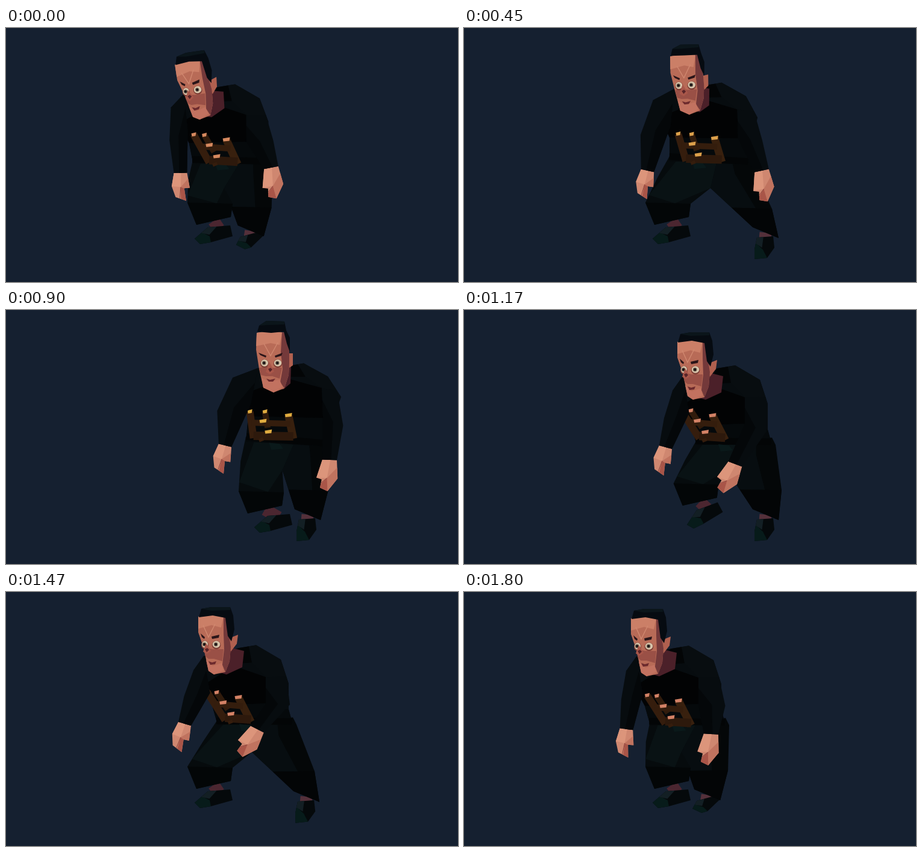
An HTML page that plays this animation: 750 px wide and 422 px high, repeating every 1.83 s.

```html
<!DOCTYPE html>
<html lang="en">
<head>
<meta charset="utf-8">
<title>Low-poly shuffle</title>
<style>
html, body { margin: 0; width: 100%; height: 100%; overflow: hidden; background: #152030; }
svg { display: block; width: 100%; height: 100%; }
</style>
</head>
<body>
<svg id="stage" viewBox="0 0 750 422"></svg>
<script>
const LOOP = 1830, STEP = 30;
const stage = document.getElementById('stage');

// The few free controls; the rest of the body follows from them.
const TIMES = [0, 450, 720, 900, 1170, 1470, 1800];
const HEAD = [[308, 104], [367, 95], [437, 110], [440, 88], [374, 99], [339, 87], [297, 90]];
const WRIST_L = [[289, 241], [304, 237], [350, 236], [363, 225], [334, 228], [296, 219], [269, 228]];
const WRIST_R = [[440, 232], [494, 237], [545, 253], [537, 249], [450, 256], [417, 228], [410, 236]];

const clamp = v => Math.min(1, Math.max(0, v));
const ease = (from, to, t) => { const u = clamp((t - from) / (to - from)); return u * u * (3 - 2 * u); };
const lerp = (a, b, k) => a + (b - a) * k;
const mix = (p, q, k) => p.map((v, i) => lerp(v, q[i], k));
const add = (p, x, y) => [p[0] + x, p[1] + y];
const points = text => text.split(' ').map(pair => pair.split(',').map(Number));

// A shape in two views; morph(k) blends from the first to the second.
function views(first, second) {
  const a = points(first), b = points(second);
  return k => a.map((p, i) => mix(p, b[i], k));
}

function place(shape, [x, y], degrees = 0) {
  const c = Math.cos(degrees * Math.PI / 180), s = Math.sin(degrees * Math.PI / 180);
  return shape.map(([px, py]) => [x + px * c - py * s, y + px * s + py * c]);
}

// Body shapes hang from the collar, hands from the wrist, feet from the ankle.
const torsoShape = views(
  '-24,4 0,0 40,22 62,56 42,112 36,138 -96,130 -92,88 -118,24 -76,8 30,41 32,91',
  '-30,5 0,0 41,24 54,64 54,107 61,132 -64,132 -73,100 -104,42 -87,18 16,53 16,97');
const stickShape = views('-80,84 -55,84 -16,90 -74,128 -8,129', '-78,79 -62,80 -26,88 -48,126 -5,129');
const handLShape = points('-10,-3 11,3 8,28 -1,26 -4,47 -19,36 -20,17');
const handRShape = points('-12,1 12,-1 17,29 3,52 -10,48 -9,34 -18,32');
const footLShape = points('-10,-14 27,-17 31,1 -5,11 -23,14 -32,5');
const footRShape = views('-11,0 16,-2 18,17 6,34 -15,36 -15,20', '-14,2 18,-7 24,0 4,19 -6,22 -21,15');

// Face features, centred between the eyes: front view, then turned left.
const face = {
  neck: views('20,4 33,6 32,34 20,44 8,40', '28,4 56,11 53,38 27,50 12,46'),
  skull: views('-24,-50 0,-54 24,-50 30,-22 30,0 29,20 22,42 4,49 -13,41 -20,10 -25,-22',
    '-20,-46 4,-50 26,-46 31,-16 34,4 32,28 25,46 6,50 -3,44 -11,6 -20,-20'),
  brow: views('-24,-50 0,-54 18,-50 14,-30 -1,-33 -25,-28', '-20,-46 4,-50 22,-47 18,-28 2,-32 -20,-26'),
  side: views('18,-51 24,-50 30,-22 30,0 29,20 22,42 15,32 19,10 16,-18',
    '22,-47 26,-46 31,-16 34,4 32,28 25,46 20,34 23,8 22,-18'),
  cheek: views('-20,8 -6,6 4,8 18,8 14,26 2,22 -9,22 -17,20', '-11,8 -6,6 4,8 22,8 20,28 6,24 -3,24 -8,20'),
  chin: views('-16,25 -4,31 14,28 19,40 4,49 -13,41', '-7,26 4,36 19,31 22,43 6,50 -3,44'),
  ear: views('28,-16 36,-16 36,4 30,8', '31,-10 46,-16 44,-1 34,12'),
  nose: views('-3,-2 -9,15 -2,19 5,14', '-7,-2 -12,12 -6,16 1,11'),
  nostril: views('-5,10 -1,8 2,11 -2,15', '-9,8 -5,6 -2,9 -6,13'),
  mouth: views('-8,26 -2,28 7,26 3,31 -4,31', '-3,28 3,30 10,28 8,33 0,34'),
  creases: views('-12,-32 -1,-12 11,-34', '-12,-32 -3,-12 8,-34'),
  browL: views('-21,-17 -8,-12 -9,-9 -18,-13', '-16,-18 -9,-12 -10,-9 -14,-12'),
  browR: views('6,-12 19,-17 17,-12 7,-9', '2,-13 15,-16 14,-11 3,-9'),
  hair: views('-20,-62 -8,-70 22,-69 25,-54 31,-42 31,-18 26,-32 21,-52 0,-50 -23,-52',
    '-15,-59 2,-62 33,-62 38,-48 40,-25 35,-5 29,-14 25,-44 4,-48 -19,-45'),
  sheen: views('-20,-62 -8,-70 22,-69 22,-64 -8,-63', '-15,-59 2,-62 33,-62 33,-57 2,-56')
};

// Monotone cubic through the key points, without overshoot.
function follow(keys, time) {
  const last = TIMES.length - 1, t = Math.min(time, TIMES[last]);
  let i = 0;
  while (i < last - 1 && t >= TIMES[i + 1]) i++;
  const span = TIMES[i + 1] - TIMES[i], u = (t - TIMES[i]) / span, v = 1 - u;
  return [0, 1].map(axis => {
    const secant = k => (keys[k + 1][axis] - keys[k][axis]) / (TIMES[k + 1] - TIMES[k]);
    const slope = k => {
      const a = secant(Math.max(0, k - 1)), b = secant(Math.min(last - 1, k));
      return a * b <= 0 ? 0 : 2 * a * b / (a + b);
    };
    return keys[i][axis] * (1 + 2 * u) * v * v + keys[i + 1][axis] * u * u * (3 - 2 * u)
      + span * u * v * (slope(i) * v - slope(i + 1) * u);
  });
}

const coords = list => list.map(p => p.map(v => v.toFixed(1)).join()).join(' ');
const poly = (list, fill) => `<polygon points="${coords(list)}" fill="${fill}"/>`;
const line = (list, stroke, width) =>
  `<polyline points="${coords(list)}" fill="none" stroke="${stroke}" stroke-width="${width}"/>`;

// Degrees by which an arm swings to the left of straight down.
const swing = (shoulder, wrist) =>
  Math.atan2(shoulder[0] - wrist[0], wrist[1] - shoulder[1]) * 180 / Math.PI;

function drawFoot(f, cuffA, cuffB, skin) {
  const ankle = mix(f[0], f[1], .5);
  return line([mix(cuffA, cuffB, .5), add(ankle, 0, 4)], skin, 20)
    + poly(f, '#05090b')
    + poly([mix(f[0], f[5], .45), mix(f[0], f[3], .6), f[3], f[4], f[5]], '#071b1a')
    + poly([f[0], mix(f[0], f[1], .4), mix(f[0], f[3], .5), mix(f[0], f[5], .5)], '#131f24');
}

function drawLegs(torso, time) {
  // Left foot steps right and back; right foot steps in near the loop's seam.
  const stepL = ease(500, 800, time) - ease(960, 1410, time);
  const stepR = ease(1440, 1800, time) - ease(1790, 2190, time) + 1 - ease(-40, 360, time);
  const air = Math.sin(Math.PI * stepL);
  const ankleL = [345 + 99 * stepL, 345 + 11 * stepL - 8 * air];
  const ankleR = [497 - 97 * clamp(stepR), 348 - 3 * clamp(stepR)];
  const footL = place(footLShape, ankleL, -16 * air);
  const footR = place(footRShape(clamp(stepR)), ankleR);
  const crotch = [(ankleL[0] + ankleR[0]) / 2 - 12, 266];

  const shift = add(ankleL, -14 * stepL, 0);
  const [kneeIn, cuffIn, cuffOut, kneeOut] = place(points('31,-53 28,-31 -29,-18 -44,-55'), shift);
  const waistL = torso[6], waistMid = mix(torso[6], torso[5], .6);
  const hipL = add(mix(waistL, kneeOut, .4), -4, 0);
  const legL = [add(waistL, 0, -8), waistMid, crotch, kneeIn, cuffIn, cuffOut, kneeOut, hipL];

  const hipR = add(torso[5], 6, 0);
  const [outR, inR] = [add(ankleR, 25, 1), add(ankleR, -18, -17)];
  const kneeR = add(mix(hipR, outR, .6), 7, 0), innerR = mix(crotch, inR, .5);
  const legR = [mix(torso[6], torso[5], .3), add(torso[5], 0, -12), hipR, kneeR, outR, inR, innerR, crotch];

  return drawFoot(footL, cuffIn, cuffOut, '#4b2630') + drawFoot(footR, outR, inR, '#54303a')
    + poly(legR, '#040708')
    + poly([legR[0], mix(legR[0], legR[1], .7), mix(hipR, crotch, .4), mix(kneeR, innerR, .4), innerR, crotch], '#070d10')
    + poly([mix(kneeR, innerR, .45), kneeR, outR, inR, innerR], '#030506')
    + poly(legL, '#060b0d')
    + poly([mix(legL[0], waistMid, .2), waistMid, crotch, mix(kneeIn, kneeOut, .35), mix(kneeOut, hipL, .3)], '#091214')
    + poly([kneeIn, cuffIn, cuffOut, kneeOut, mix(kneeIn, kneeOut, .45)], '#030607');
}

function drawTorso(t) {
  const chest = mix(t[9], t[3], .35), nape = mix(t[0], t[1], .6), front = mix(t[0], t[10], .5);
  const buckle = add(mix(t[6], t[5], .35), 2, 3);
  return poly(t.slice(0, 10), '#070c0f')
    + poly([mix(t[7], t[8], .55), chest, t[10], t[11], t[7]], '#020304')
    + poly([t[0], nape, front, mix(t[9], t[3], .3)], '#030506')
    + poly([nape, t[1], t[2], t[3], t[10], front], '#080d10')
    + poly([t[7], t[11], t[4], t[5], t[6]], '#05090b')
    + line([mix(t[6], t[7], .2), mix(t[5], t[4], .2)], '#030506', 11)
    + poly(place(points('-10,-4 8,-2 14,6 -6,8'), buckle), '#0a191a');
}

function drawSticks([a, b, c, baseA, baseC], glint) {
  const cap = `rgb(${mix([212, 130, 102], [224, 172, 64], glint).map(Math.round)})`;
  const barL = mix(a, baseA, .42), barR = mix(c, baseC, .36);
  const baseB = mix(baseA, baseC, .4), foot = mix(baseA, baseC, .18);
  const top = ([x, y], w) => poly(place([[-w, -2], [w, -4], [w - 1, 2], [1 - w, 3]], [x, y]), cap);
  return line([a, baseA], '#351d0d', 12) + line([b, mix(b, baseB, .6)], '#301b0c', 10)
    + line([c, baseC], '#38200e', 13) + line([barL, barR], '#341d0d', 10)
    + line([add(baseA, 0, -4), add(baseC, 0, -4)], '#2d190c', 14)
    + line([foot, add(foot, 2, 5)], '#351d0d', 8)
    + top(a, 4) + top(b, 4) + top(c, 6)
    + top(add(mix(barL, barR, .3), 0, -3), 6) + top(mix(baseB, b, .24), 6);
}

function drawHand(h) {
  const knuckle = mix(h[2], h[6], .5);
  return poly(h, '#cf8770')
    + poly([h[0], mix(h[0], h[1], .55), knuckle, h[6]], '#dc957b')
    + poly([mix(h[1], h[2], .4), h[2], h[3], knuckle], '#c0735f')
    + poly([knuckle, h[3], h[4], mix(h[4], h[5], .5)], '#a95548')
    + line([knuckle, mix(h[4], h[5], .6)], '#8c443d', 1);
}

// Sleeve from shoulder to wrist, with the elbow pushed outwards.
function drawArm(top, shoulder, armpit, hand, outer, inner, bulge) {
  const elbow = add(mix(shoulder, hand[outer], .5), bulge, 0);
  const cuff = hand[inner];
  return poly([top, shoulder, elbow, hand[outer], cuff, armpit], '#070c0f')
    + poly([mix(top, armpit, .4), armpit, cuff, mix(hand[outer], cuff, .4), mix(elbow, armpit, .5)], '#040709');
}

function drawEye(x, rx) {
  return `<ellipse cx="${x}" cy="1" rx="${rx + 1}" ry="7" fill="#7c3d35"/>`
    + `<ellipse cx="${x}" rx="${rx}" ry="5.8" fill="#d8c6ac"/>`
    + `<circle cx="${x - .8}" r="3.2" fill="#6c5a4c"/><circle cx="${x - .8}" r="2" fill="#151314"/>`;
}

function drawHead([x, y], tilt, turn) {
  const part = (name, fill) => poly(face[name](turn), fill);
  return `<g transform="translate(${x} ${y}) rotate(${tilt})">`
    + part('neck', '#4b2029') + part('ear', '#b0604f') + part('skull', '#b86b57')
    + part('brow', '#cb7f67') + part('cheek', '#9a5046') + part('side', '#74393a')
    + part('chin', '#c27260') + line(face.creases(turn), '#d08870', 1.4)
    + drawEye(lerp(-11, -9, turn), lerp(6, 5, turn)) + drawEye(lerp(11, 10, turn), 6.3)
    + part('nose', '#a9574a') + part('nostril', '#572428') + part('mouth', '#6c2a2d')
    + part('browL', '#2a1519') + part('browR', '#2a1519')
    + part('hair', '#060b11') + part('sheen', '#0b151a') + '</g>';
}

function render(time) {
  const turn = clamp((700 - time) / 850) + ease(930, 1170, time);
  const tilt = -9 * (1 - ease(0, 700, time));
  const sway = 12 * Math.cos(2 * Math.PI * (time / LOOP - .1));
  const hop = -9 * Math.sin(Math.PI * clamp(time / TIMES[1]));

  const head = follow(HEAD, time), wristL = follow(WRIST_L, time), wristR = follow(WRIST_R, time);
  const collar = [head[0] + 54 + 22 * turn, 91 + .3 * (head[1] - 96)];
  const torso = place(torsoShape(turn), collar);
  const swingR = swing(torso[3], wristR);
  const handL = place(handLShape, wristL, swing(torso[8], wristL) - 9);
  const handR = place(handRShape, wristR, swingR - 3);
  const sticks = place(stickShape(turn), add(collar, sway, sway * .4));

  stage.innerHTML = '<rect width="750" height="422" fill="#152030"/>' + drawLegs(torso, time)
    + `<g transform="translate(0 ${hop})">` + drawTorso(torso) + drawSticks(sticks, 1 - turn)
    + drawHand(handL) + drawArm(torso[9], torso[8], mix(torso[7], torso[9], .25), handL, 0, 1, 11 * turn - 14)
    + drawHand(handR) + drawArm(torso[10], mix(torso[2], torso[3], .7), torso[11], handR, 1, 0, 4 + .6 * swingR)
    + drawHead(head, tilt, turn) + '</g>';
}

const start = performance.now();
function tick() {
  const time = (performance.now() - start) % LOOP;
  render(Math.floor(time / STEP) * STEP);
  requestAnimationFrame(tick);
}
tick();
</script>
</body>
</html>
```
